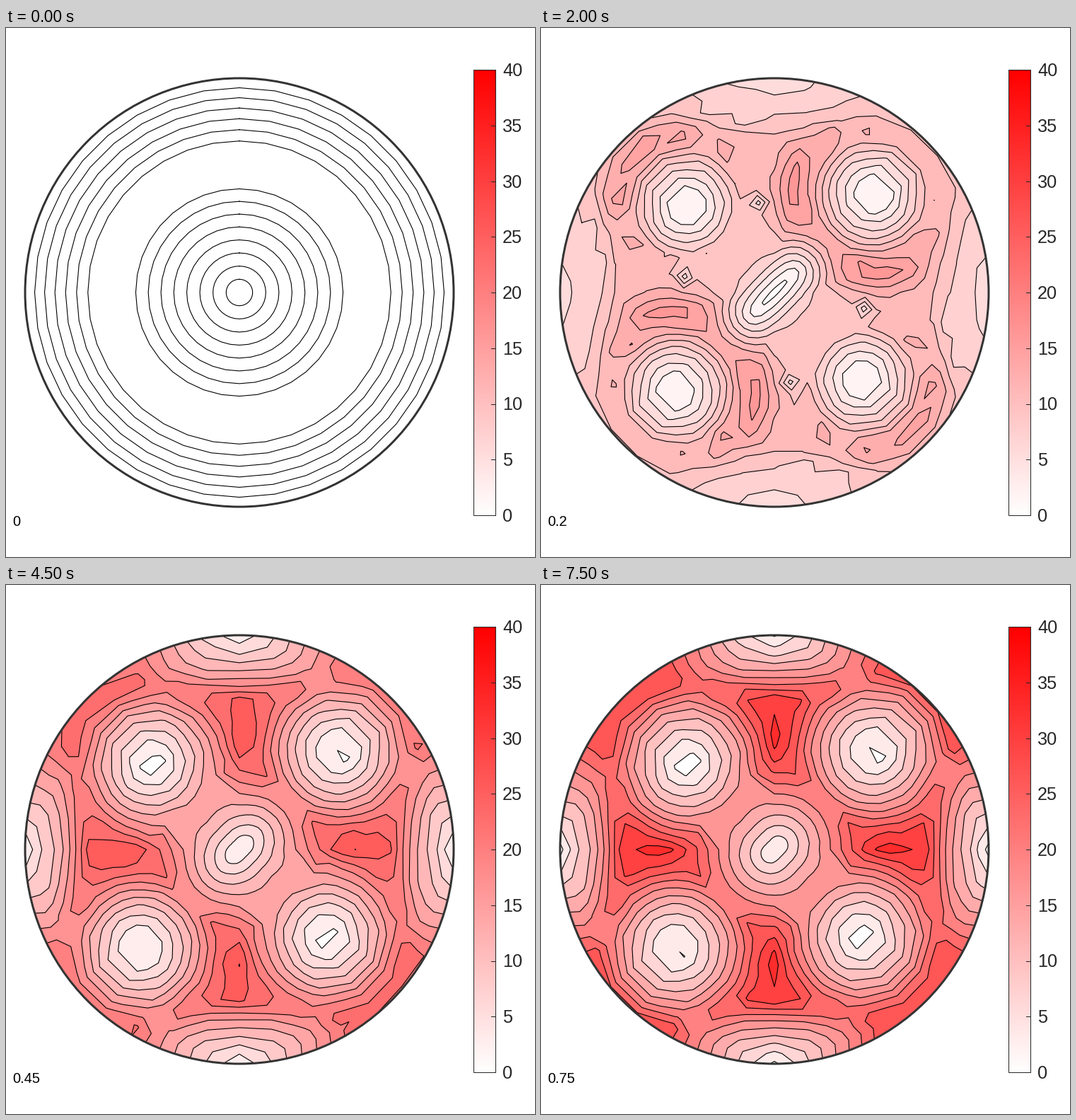
Animation of 748x748 px, one loop 8 s. Source, as a matplotlib script:

```python
import numpy as np
import matplotlib.pyplot as plt
from matplotlib.animation import FuncAnimation
from matplotlib.patches import Circle, Rectangle

SIZE, DPI = 748, 100
PX = 72 / DPI
CX, CY, R = 330, 374, 303
FRAMES, STEP_MS = 16, 500
VMAX = 40
DARK = "#262626"
FONT = "Liberation Sans"


def radius(tilt):
    """Equal-area projection, tilt in degrees."""
    return R * np.sqrt(2) * np.sin(np.radians(tilt) / 2)


def sigmoid(x):
    return 1 / (1 + np.exp(-x))


tilt, azim = np.meshgrid(np.arange(0, 91, 5), np.arange(0, 361, 10), indexing="ij")
rad = radius(tilt)
dx, dy = rad * np.sin(np.radians(azim)), rad * np.cos(np.radians(azim))
X, Y = CX + dx, CY - dy

# Mirror-folded coordinates: p along the rising diagonal, q along the falling one
p, q = np.abs(dx + dy) / np.sqrt(2), np.abs(dx - dy) / np.sqrt(2)
fold = np.degrees(np.arctan2(p, q))
fold[0] = 45
P_WELL, Q_WELL = radius(55), radius(48)


def blob(t, a, wt, wa):
    return np.exp(-((tilt - t) / wt) ** 2 / 2 - ((fold - a) / wa) ** 2 / 2)


def disc(u, v, size):
    """Flat-topped disc with a steep edge."""
    return sigmoid((size - np.hypot(p - u, q - v)) / 7)


def cone(dist, slope, reach, shift=0.0):
    """Valley that is linear near its floor and steep beyond its reach."""
    return dist / slope + (dist / reach) ** 4 + shift


def valleys(slope, reach):
    return [cone(np.hypot(p - P_WELL, q), slope, reach, -0.15),
            cone(np.hypot(p, q - Q_WELL), slope, reach, -0.15)]


def core(half, slope, shift):
    return np.hypot(np.maximum(p - half, 0), q) / slope + shift


def early_field():
    sectors = 2.9 * disc(178, 0, 118) + 4.0 * disc(0, 205, 95)
    f = 5.4 - (rad / R) ** 4 + sectors + 2.7 * blob(45, 60, 11, 7) - 0.7 * blob(25, 0, 3, 9)
    for t, a, depth in [(35, 35, 3.6), (70, 35, 1.2), (80, 25, 1.2)]:
        f -= depth * blob(t, a, 2, 4)
    return np.minimum.reduce([f, *valleys(12.5, 80), core(40, 8, 0.3)])


def late_field():
    bridge = 3.1 * sigmoid((60 - p) / 5) * sigmoid((185 - q) / 12)
    f = 8.4 - bridge + 2.1 * blob(45, 45, 9, 5) + blob(65, 45, 8, 9)
    for t, a in [(25, 65), (65, 55), (80, 25), (80, 65), (88, 90)]:
        f += 0.9 * blob(t, a, 3, 5)
    arc = rad * np.radians(fold - 45) / 1.8
    rim = cone(np.hypot(R - rad, arc), 12.5, 75, 0.7)
    return np.minimum.reduce([f, *valleys(16, 95), core(8, 15, 1.1), rim])


noise = np.random.default_rng(4).normal(0, 0.1, rad.shape) * np.sin(np.radians(tilt))
noise[:, -1] = noise[:, 0]
EARLY, LATE = early_field() + noise, late_field() + noise

fig = plt.figure(figsize=(SIZE / DPI, SIZE / DPI), dpi=DPI, facecolor="white")
ax = fig.add_axes([0, 0, 1, 1])


def setup_axes():
    ax.set_xlim(0, SIZE)
    ax.set_ylim(SIZE, 0)
    ax.set_aspect("auto")
    ax.axis("off")


def draw_colorbar(x=661, y=59, w=31.5, h=630):
    ramp = np.ones((256, 1, 3))
    ramp[:, 0, 1:] = np.linspace(0, 1, 256)[:, None]
    ax.imshow(ramp, extent=(x, x + w, y + h, y), aspect="auto", interpolation="bilinear")
    ax.add_patch(Rectangle((x, y), w, h, fill=False, ec=DARK, lw=PX))
    for v in range(0, VMAX + 1, 5):
        ty = y + h * (1 - v / VMAX)
        ax.plot([x + w - 6, x + w], [ty, ty], color=DARK, lw=PX)
        ax.text(702, ty + 9, str(v), color=DARK, fontsize=25.2 * PX, family=FONT, va="baseline")


draw_colorbar()
setup_axes()
ax.add_patch(Circle((CX, CY), R, fill=False, ec="#333333", lw=3 * PX, zorder=5))
label = ax.text(9, 703.5, "0", fontsize=20 * PX, family=FONT, color="black")
shown = []


def draw_rings():
    phi = np.radians(np.arange(0, 361, 10))
    for t in [*range(5, 41, 5), *range(60, 86, 5)]:
        r = radius(t)
        shown.extend(ax.plot(CX + r * np.sin(phi), CY - r * np.cos(phi), color="black", lw=1.1 * PX))


def draw_contours(strain):
    step = 3.55 * (1 - np.exp(-strain / 0.28))
    mix = max(-0.25, (1 - np.exp(-(strain - 0.15) / 0.15)) / (1 - np.exp(-4)))
    field = np.clip(EARLY + mix * (LATE - EARLY), 0.02, 10.95)
    shade = np.clip(1 - np.arange(11) * step / VMAX, 0, 1)
    colors = [(1, s, s) for s in shade]
    shown.append(ax.contourf(X, Y, field, levels=np.arange(12), colors=colors, zorder=1))
    shown.append(ax.contour(X, Y, field, levels=np.arange(1, 11), colors="black",
                            linewidths=1.1 * PX, zorder=2))


def update(i):
    while shown:
        shown.pop().remove()
    strain = 0.05 * i
    label.set_text(f"{strain:.4g}")
    if i == 0:
        draw_rings()
    else:
        draw_contours(strain)
    setup_axes()
    return []


anim = FuncAnimation(fig, update, frames=FRAMES, interval=STEP_MS,
                     init_func=lambda: [], repeat=True, repeat_delay=0)
plt.show()
```
